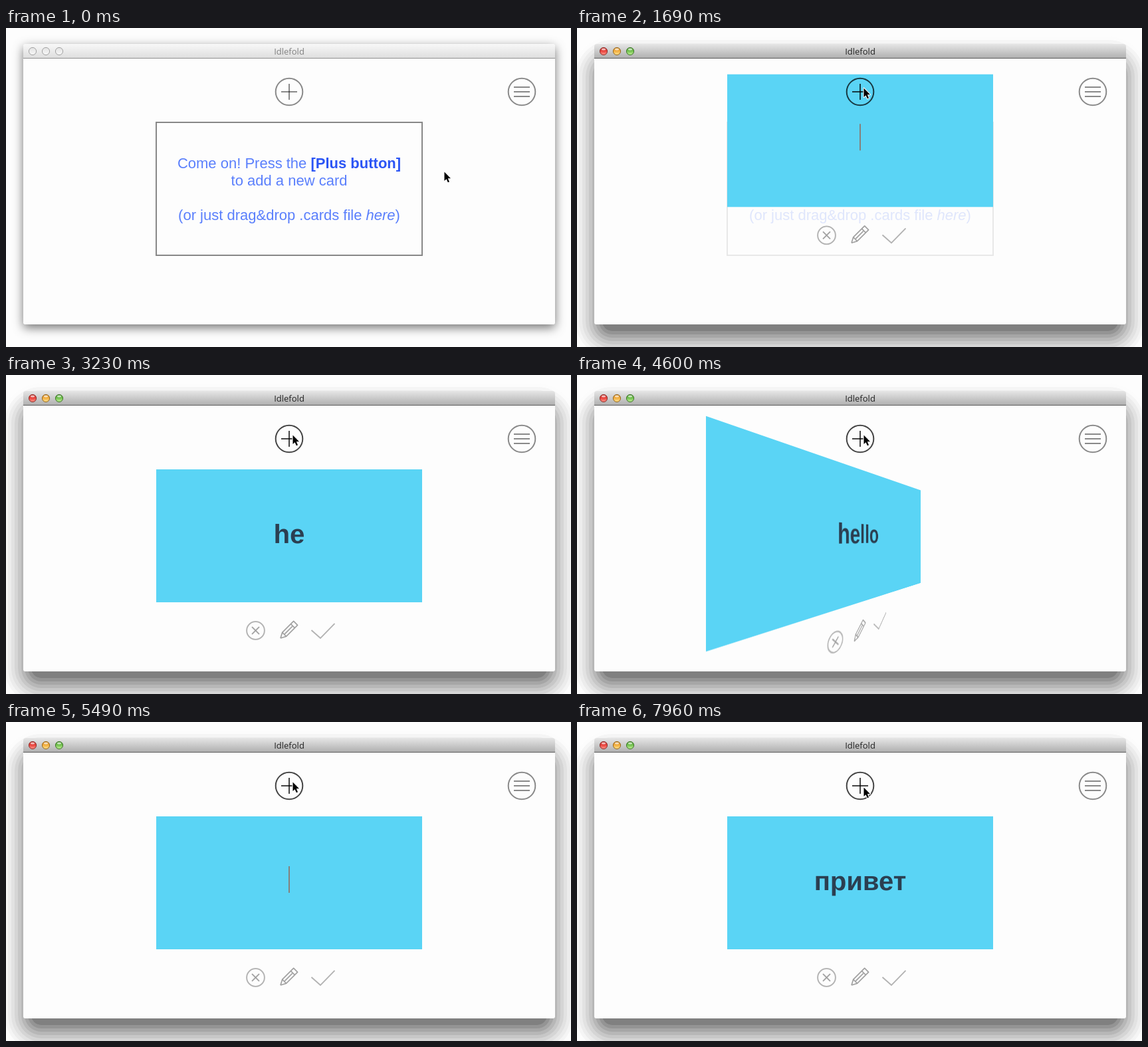
An HTML page with a canvas that plays this animation: 850x480 px, repeating every 8000 ms.

```html
<!DOCTYPE html>
<html lang="en">
<head>
<meta charset="utf-8">
<title>Idlefold</title>
<style>
  html, body { margin: 0; width: 100%; height: 100%; overflow: hidden; background: #fdfdfd; }
  #stage { position: relative; width: 850px; height: 480px; overflow: hidden; }
  #stage > canvas { position: absolute; left: 0; top: 0; }
  #scene {
    position: absolute; left: 26px; top: 46px; width: 800px; height: 400px;
    overflow: hidden; perspective: 347px; perspective-origin: 400px 200px;
  }
  #card {
    position: absolute; left: 200px; top: 96px; width: 400px; height: 264px;
    transform-origin: 200px 100px;
  }
</style>
</head>
<body>
<div id="stage">
  <canvas id="back" width="850" height="480"></canvas>
  <div id="scene"><canvas id="card" width="800" height="528"></canvas></div>
  <canvas id="front" width="850" height="480"></canvas>
</div>
<script>
const LOOP = 8000;
const ACTIVATE = 1510;
const FLIP = 4600;
const FLIP_END = 5490;
const SANS = '"Liberation Sans", Arial, sans-serif';
const TITLE_FONT = '13px "Open Sans", "Noto Sans", sans-serif';
const cardEl = document.getElementById('card');
const [back, front, card] = ['back', 'front', 'card'].map(id => document.getElementById(id).getContext('2d'));

// time, text on the card, caret shown
const typing = [
  [0, '', 1], [2540, '', 0],
  [3050, 'h', 1], [3140, 'he', 1], [3230, 'he', 0],
  [3760, 'hel', 1], [3940, 'hell', 1], [4120, 'hello', 1], [FLIP, 'hello', 0],
  [FLIP_END, '', 1], [5930, 'п', 1], [6040, 'пр', 1], [6130, 'при', 1], [6220, 'при', 0],
  [6400, 'прив', 0], [6520, 'приве', 0], [6700, 'привет', 0], [6760, 'привет', 1], [7420, 'привет', 0]
];

const clamp = v => Math.min(1, Math.max(0, v));
const mix = (a, b, k) => a + (b - a) * k;
const easeOutExpo = p => 1 - Math.pow(2, -10 * p);

// CSS "ease", cubic-bezier(.25, .1, .25, 1)
function ease(p) {
  if (p <= 0 || p >= 1) return clamp(p);
  const at = (a, b, s) => 3 * (1 - s) * (1 - s) * s * a + 3 * (1 - s) * s * s * b + s * s * s;
  let lo = 0, hi = 1;
  for (let i = 0; i < 24; i++) {
    const mid = (lo + hi) / 2;
    if (at(0.25, 0.25, mid) < p) lo = mid; else hi = mid;
  }
  return at(0.1, 1, lo);
}

function line(c, ...pts) {
  c.beginPath();
  for (let i = 0; i < pts.length; i += 2) c.lineTo(pts[i], pts[i + 1]);
  c.stroke();
}

function circle(c, x, y, r) {
  c.beginPath();
  c.arc(x, y, r, 0, 7);
}

function box(c, x, y, w, h, radii) {
  c.beginPath();
  c.roundRect(x, y, w, h, radii);
}

function drawShadow(c, active) {
  if (active) {
    for (let i = 9; i >= 0; i--) {
      const spread = -12 + 5 * i;
      const grey = Math.round(255 - 127 * Math.pow(1 - i / 10, 1.6));
      c.fillStyle = `rgb(${grey},${grey},${grey})`;
      box(c, 26 - spread, 46 - spread, 800 + 2 * spread, 422 + 2 * spread, 27 + spread);
      c.fill();
    }
    return;
  }
  c.save();
  c.shadowColor = 'rgba(0,0,0,.55)';
  c.shadowBlur = 15;
  c.shadowOffsetY = 5;
  c.fillStyle = '#fff';
  box(c, 26, 24, 800, 422, 4);
  c.fill();
  c.restore();
}

function drawLight(c, x, color, active) {
  const g = c.createLinearGradient(0, 29, 0, 41);
  if (active) {
    g.addColorStop(0, color[0]);
    g.addColorStop(0.45, color[1]);
    g.addColorStop(1, color[2]);
  } else {
    g.addColorStop(0, '#e2e2e2');
    g.addColorStop(1, '#f8f8f8');
  }
  circle(c, x, 35, 5.6);
  c.fillStyle = g;
  c.fill();
  c.lineWidth = 1;
  c.strokeStyle = active ? color[3] : '#a2a2a2';
  c.stroke();
  if (!active) return;
  c.fillStyle = 'rgba(255,255,255,.65)';
  c.beginPath();
  c.ellipse(x, 32, 3, 1.6, 0, 0, 7);
  c.fill();
}

function drawWindow(c, active) {
  drawShadow(c, active);
  c.fillStyle = '#fdfdfd';
  box(c, 26, 24, 800, 422, [4, 4, 3, 3]);
  c.fill();
  const g = c.createLinearGradient(0, 24, 0, 45);
  g.addColorStop(0, active ? '#e6e6e6' : '#f8f8f8');
  g.addColorStop(1, active ? '#b0b0b0' : '#dedede');
  c.fillStyle = g;
  box(c, 26, 24, 800, 22, [4, 4, 0, 0]);
  c.fill();
  c.fillStyle = active ? '#5c5c5c' : '#909090';
  c.fillRect(26, 45, 800, 1);
  drawLight(c, 40, ['#c23a35', '#e8413a', '#ff9d92', '#8e2f2b'], active);
  drawLight(c, 60, ['#d08a2c', '#f2ac3c', '#ffe795', '#96691f'], active);
  drawLight(c, 80, ['#4f9a35', '#6fbf4c', '#c8f59b', '#41752d'], active);
  c.font = TITLE_FONT;
  c.textAlign = 'center';
  c.fillStyle = active ? '#202020' : '#808080';
  c.fillText('Idlefold', 426, 40);
}

// runs: pairs of font style and text, centred as one line
function richLine(c, y, ...runs) {
  const setFont = i => { c.font = `${runs[i]} 22px ${SANS}`; };
  let width = 0;
  for (let i = 0; i < runs.length; i += 2) {
    setFont(i);
    width += c.measureText(runs[i + 1]).width;
  }
  let x = 426 - width / 2;
  c.textAlign = 'left';
  for (let i = 0; i < runs.length; i += 2) {
    setFont(i);
    c.fillStyle = runs[i] === 'bold' ? '#2b55f5' : '#5a7ffc';
    c.fillText(runs[i + 1], x, y);
    x += c.measureText(runs[i + 1]).width;
  }
}

function drawHint(c, alpha) {
  if (alpha <= 0) return;
  c.save();
  c.globalAlpha = alpha;
  c.strokeStyle = '#888';
  c.lineWidth = 2;
  c.strokeRect(226, 142, 400, 200);
  richLine(c, 211, 'normal', 'Come on! Press the ', 'bold', '[Plus button]');
  richLine(c, 237, 'normal', 'to add a new card');
  richLine(c, 289, 'normal', '(or just drag&drop .cards file ', 'italic', 'here', 'normal', ')');
  c.restore();
}

function drawTools(c) {
  c.strokeStyle = '#b2b2b2';
  c.lineWidth = 1.9;
  circle(c, 375.5, 384.5, 13.4);
  c.stroke();
  c.strokeStyle = '#a2a2a2';
  line(c, 370, 379, 381, 390);
  line(c, 381, 379, 370, 390);
  c.strokeStyle = '#b2b2b2';
  line(c, 459.5, 384, 473, 396, 494.5, 374);

  c.save();
  c.translate(413, 396);
  c.rotate(-Math.PI / 4);
  c.strokeStyle = '#a0a0a0';
  c.lineWidth = 1.7;
  c.lineJoin = 'round';
  line(c, 0, 0, 8, -4.2, 32, -4.2, 32, 4.2, 8, 4.2, 0, 0);
  line(c, 8, -4.2, 8, 4.2);
  line(c, 26, -4.2, 26, 4.2);
  line(c, 9, 0, 25, 0);
  c.restore();
}

function drawCard(c, text, caret) {
  c.setTransform(2, 0, 0, 2, -452, -284);
  c.clearRect(226, 142, 400, 264);
  c.fillStyle = '#5ad4f5';
  c.fillRect(226, 142, 400, 200);
  c.font = `bold 40px ${SANS}`;
  c.textAlign = 'center';
  c.fillStyle = '#2b3f51';
  c.fillText(text, 426, 253);
  if (caret) {
    c.fillStyle = '#85817c';
    c.fillRect(Math.round(425 + c.measureText(text).width / 2), 217, 2, 40);
  }
  drawTools(c);
}

function drawButtons(c, active) {
  c.lineWidth = 2;
  c.strokeStyle = `rgba(0,0,0,${active ? 0.73 : 0.46})`;
  circle(c, 426, 96, 20.3);
  c.stroke();
  line(c, 414, 96, 438, 96);
  line(c, 426, 84, 426, 108);
  c.strokeStyle = 'rgba(0,0,0,.46)';
  circle(c, 776, 96, 20.3);
  c.stroke();
  for (const y of [89, 96, 103]) line(c, 764, y, 788, y);
}

function drawCursor(c, x, y) {
  c.save();
  c.translate(x, y);
  c.beginPath();
  for (const [px, py] of [[0.5, 0.5], [0.5, 14], [3.6, 11.2], [5.8, 16.3], [8, 15.4], [5.8, 10.3], [10, 10.3]]) c.lineTo(px, py);
  c.closePath();
  c.lineJoin = 'round';
  c.lineWidth = 2;
  c.strokeStyle = '#fff';
  c.stroke();
  c.fillStyle = '#000';
  c.fill();
  c.restore();
}

function cursorAt(t) {
  if (t >= 7960) return [431, 98];
  const step = t < 600 ? 0 : Math.min(9, 1 + Math.floor((t - 600) / 62.5));
  const k = step / 9;
  const p = k * k * (3 - 2 * k);
  return [mix(659, 431, p), mix(216, 90, p)];
}

const flipAngle = t => 180 * easeOutExpo((t - 4554) / 1022);

function cardTransform(slide, t) {
  if (t < FLIP || t >= FLIP_END) return `translateY(${-400 * (1 - slide)}px)`;
  const angle = flipAngle(t);
  return `rotateY(${angle < 90 ? angle : angle - 180}deg)`;
}

function render(t) {
  const active = t >= ACTIVATE;
  const stepTime = ACTIVATE + 88 * Math.floor((t - ACTIVATE) / 88);
  const slide = active ? ease(clamp((stepTime - 1500) / 360)) : 0;

  back.fillStyle = '#fdfdfd';
  back.fillRect(0, 0, 850, 480);
  drawWindow(back, active);
  drawHint(back, 1 - slide);

  cardEl.style.visibility = active ? 'visible' : 'hidden';
  if (active) {
    let [, text, caret] = typing.filter(([start]) => start <= t).pop();
    if (t >= FLIP && t < FLIP_END && flipAngle(t) >= 90) text = '';
    drawCard(card, text, caret);
    cardEl.style.transform = cardTransform(slide, t);
  }

  front.clearRect(0, 0, 850, 480);
  drawButtons(front, active);
  drawCursor(front, ...cursorAt(t));
}

const begin = performance.now();
function tick() {
  render((performance.now() - begin) % LOOP);
  requestAnimationFrame(tick);
}
tick();
</script>
</body>
</html>
```
